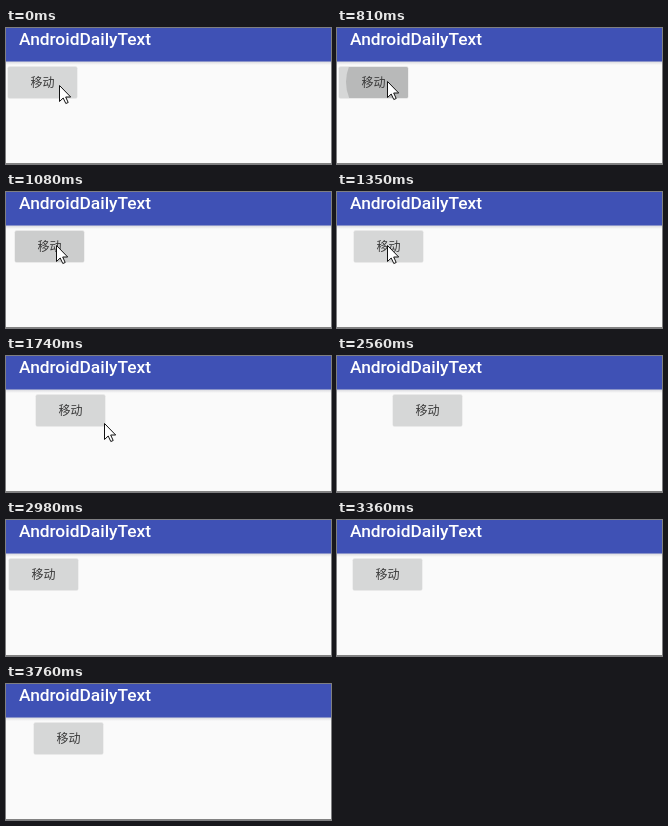
An HTML page for the animation above (3.86 s loop, 325 by 136 pixels).

```html
<!DOCTYPE html>
<html lang="zh-CN">
<head>
<meta charset="utf-8">
<title>AndroidDailyText</title>
<style>
  html, body { margin: 0; width: 100%; height: 100%; overflow: hidden; background: #fafafa; }
  svg { display: block; }
  .title { font: 500 17.35px Roboto, sans-serif; fill: #fff; }
  .label { font: 12px "Noto Sans CJK SC", "Noto Sans CJK", "Noto Sans CJK JP", sans-serif; fill: #383838; text-anchor: middle; }
</style>
</head>
<body>
<svg width="325" height="136" viewBox="0 0 325 136">
  <defs>
    <linearGradient id="shade" x2="0" y2="1">
      <stop stop-color="#d4d5da"/>
      <stop offset="1" stop-color="#fafafa"/>
    </linearGradient>
    <clipPath id="face"><rect y="39" width="69" height="31" rx="1.5"/></clipPath>
  </defs>
  <rect width="325" height="136" fill="#fafafa"/>
  <rect y="33" width="325" height="4" fill="url(#shade)"/>
  <rect width="325" height="33.5" fill="#3f51b5"/>
  <text class="title" x="13" y="16.5">AndroidDailyText</text>
  <rect y="135" width="325" height="1" fill="#828282"/>
  <g id="button">
    <rect x="-.5" y="38.3" width="70" height="32.4" rx="2" fill="#000" opacity=".09"/>
    <rect y="39" width="69" height="31" rx="1.5" fill="#d6d7d7"/>
    <g clip-path="url(#face)"><circle id="ripple" cx="48" cy="54"/></g>
    <text class="label" x="34.5" y="58.5">移动</text>
  </g>
  <path id="cursor" d="M.5 .5V16.5L4.2 13L6.8 18.5L9.2 17.5L6.7 12H11.7Z" fill="#fff" stroke="#111"/>
</svg>
<script>
const LOOP = 3860;
const STEP = 134, LEAD = 6;      // the screen refreshes every STEP ms, slightly early
const PRESS = 6 * STEP;          // the button is clicked
const LEAVE = 11 * STEP;         // the pointer starts to leave
const FIRST_RUN = 861, SECOND_RUN = 2925;
const SPEED = 0.0319;            // button speed, px per ms

const [button, ripple, cursor] = ["button", "ripple", "cursor"].map(id => document.getElementById(id));

function buttonX(t) {
  const start = t < SECOND_RUN ? FIRST_RUN : SECOND_RUN;
  return Math.round(2 + Math.max(0, t - start) * SPEED);
}

// Settles on the button, then speeds away to the lower right
function pointerAt(t) {
  const rest = Math.max(0, 1 - t / (3 * STEP));
  const away = Math.max(0, t - LEAVE) / (2 * STEP);
  return [50 + 3 * rest + 48 * away ** 1.5, 53 + 4 * rest + 14 * away ** 1.65].map(Math.round);
}

function draw(t) {
  button.setAttribute("transform", `translate(${buttonX(t)})`);

  const age = t - PRESS;
  ripple.setAttribute("r", Math.max(0, 41 + age * 0.15));
  ripple.setAttribute("opacity", age < 0 ? 0 : Math.max(0, 0.14 * (1 - age / (3 * STEP))));

  cursor.setAttribute("transform", `translate(${pointerAt(t)})`);
}

function frame() {
  const t = performance.now() % LOOP;
  draw(Math.floor((t + LEAD) / STEP) * STEP);
  requestAnimationFrame(frame);
}
frame();
</script>
</body>
</html>
```
